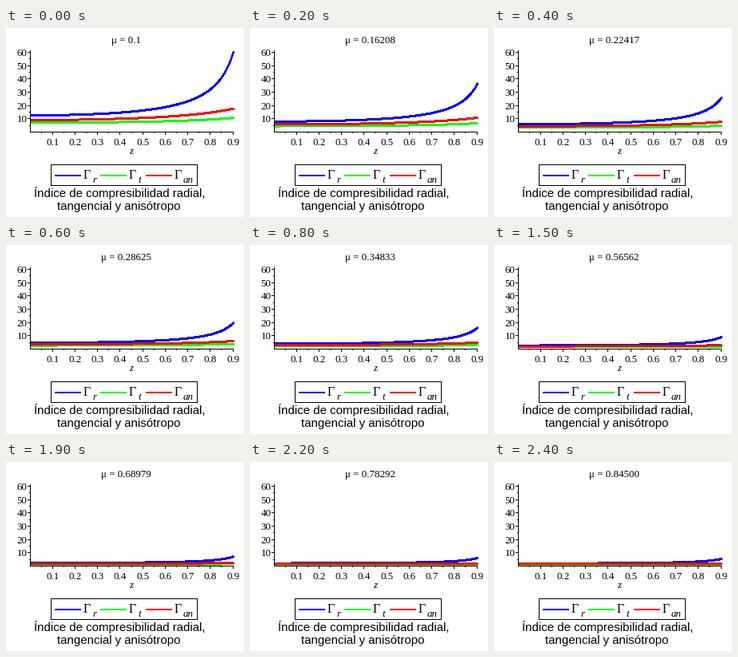
These frames come from a looping animation (298 by 237 pixels, 2.5 s). A matplotlib script:

```python
import numpy as np
import matplotlib.pyplot as plt
from matplotlib.animation import FuncAnimation
from matplotlib.patches import Rectangle

W, H, DPI = 298, 237, 100
FRAMES, INTERVAL = 25, 100
X0, X9, Y0, UNIT = 31, 285, 130.5, 1.665
SERIF, SANS = "Liberation Serif", "Liberation Sans"
BLUE, GREEN, RED = "#0000ff", "#00ff00", "#ff0000"

fig = plt.figure(figsize=(W / DPI, H / DPI), dpi=DPI, facecolor="white")
ax = fig.add_axes([0, 0, 1, 1])
ax.set_xlim(0, W)
ax.set_ylim(H, 0)
ax.axis("off")


def px(n):
    return n * 72 / DPI


def label(x, y, s, size=13, font=SERIF, ha="center", **kw):
    return ax.text(x, y, s, fontsize=px(size), family=font, ha=ha,
                   va="baseline", color="black", **kw)


def stroke(xs, ys, color="black", width=1, **kw):
    return ax.plot(xs, ys, color=color, lw=px(width), antialiased=False,
                   snap=False, solid_capstyle="butt", **kw)[0]


def to_x(z):
    return X0 + (X9 - X0) * z / 0.9


def to_y(v):
    return Y0 - UNIT * v


def ramp(z, k):
    """Rise from 0 at z = 0 to 1 at z = 0.9."""
    rise = 1 / (1 - k * z**2) - 1
    return rise / rise[-1]


# axes and ticks
stroke([30.5, 30.5], [28, 131])
stroke([30, 285], [130.5, 130.5])
for i in range(1, 19):
    x = np.floor(to_x(i * 0.05)) - 0.5
    stroke([x, x], [131, 132 if i % 2 else 134])
    if i % 2 == 0:
        label(x + 0.5, 147, f"{i / 20:.1f}")
for i in range(1, 13):
    y = np.floor(to_y(i * 5)) + 0.5
    stroke([29 if i % 2 else 27, 30], [y, y])
    if i % 2 == 0:
        label(26.5, y + 4.5, str(i * 5), ha="right")
label(157, 158, "z", style="italic")

# legend and caption
ax.add_patch(Rectangle((56.5, 171.5), 183, 26, fill=False, ec="black",
                       lw=px(1), antialiased=False, snap=False))
for x, color, sub in ((61, BLUE, "r"), (118, GREEN, "t"), (175, RED, "an")):
    stroke([x, x + 33], [185, 185], color, 2)
    label(x + 36, 189, "Γ", 16, ha="left")
    label(x + 47, 194, sub, 13, ha="left", style="italic")
label(142.5, 212, "Índice de compresibilidad radial,", 15, SANS)
label(141, 228, "tangencial y anisótropo", 15, SANS)

# each curve: colour, shape, (a, b) with value a / mu + b at both ends
z = np.linspace(0, 0.9, 255)
CURVES = (
    (BLUE, ramp(z, 1.0), (1.2, 0.55), (6.25, -1.95)),
    (GREEN, ramp(z, 0.6), (0.68, 0.3), (1.07, 0.0)),
    (RED, ramp(z, 0.6), (0.85, 0.55), (1.8, -0.3)),
)
# two hairlines one pixel apart make a pen that is thin on steep parts
PEN = (-0.5, 0.5)
pens = [[stroke(to_x(z), z, c[0], zorder=3) for _ in PEN] for c in CURVES]
title = label(150.5, 19, "")


def update(i):
    units = 10000 + 74500 * i / (FRAMES - 1)
    mu = units / 1e5
    title.set_text(f"μ = {round(units) / 1e5:.5f}" if i else "μ = 0.1")
    for pen, (_, shape, (a, b), (c, d)) in zip(pens, CURVES):
        start, end = a / mu + b, c / mu + d
        y = to_y(start + (end - start) * shape)
        for line, dy in zip(pen, PEN):
            line.set_ydata(y + dy)
    return [*sum(pens, []), title]


anim = FuncAnimation(fig, update, frames=FRAMES, interval=INTERVAL,
                     repeat=True, repeat_delay=0, blit=False)
plt.show()
```
